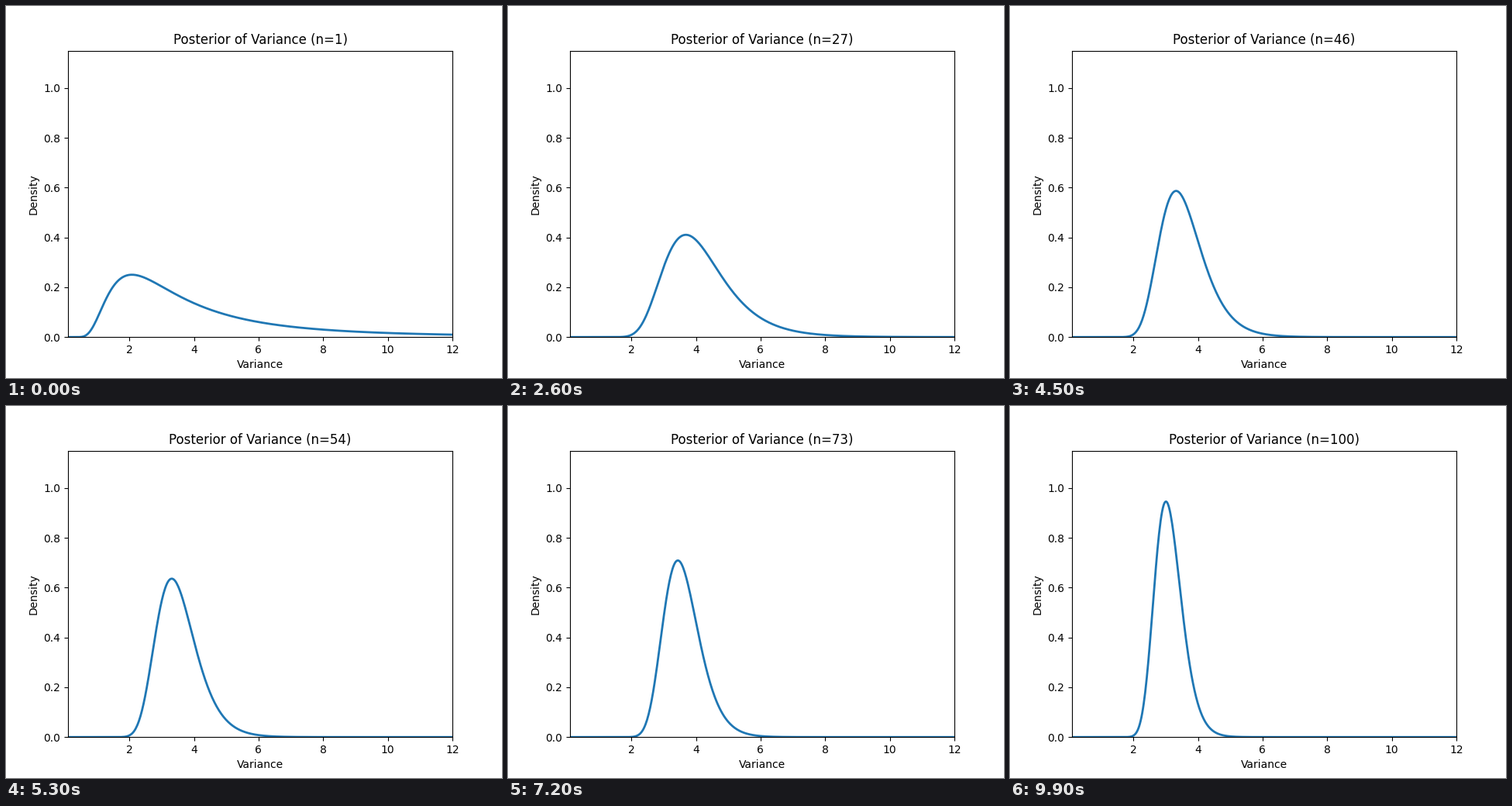
Animation, 640 px wide and 480 px high, one loop 10 s. Source, as a matplotlib script:

```python
from math import lgamma

import numpy as np
import matplotlib.pyplot as plt
from matplotlib.animation import FuncAnimation

N = 100
ALPHA0, BETA0 = 2.0, 2.0  # inverse-gamma prior
SIGMA = 2.0

np.random.seed(1)
data = np.random.normal(0, SIGMA, N)
sum_sq = np.cumsum(data ** 2)
x = np.linspace(0.1, 12, 500)


def inv_gamma_pdf(x, a, b):
    return np.exp(a * np.log(b) - lgamma(a) - (a + 1) * np.log(x) - b / x)


fig, ax = plt.subplots(figsize=(6.4, 4.8), dpi=100)
line, = ax.plot([], [], lw=2)
ax.set_xlim(0.1, 12)
ax.set_ylim(0, 1.15)
ax.set_xlabel("Variance")
ax.set_ylabel("Density")
title = ax.set_title("")


def update(i):
    n = i + 1
    line.set_data(x, inv_gamma_pdf(x, ALPHA0 + n / 2, BETA0 + sum_sq[i] / 2))
    title.set_text(f"Posterior of Variance (n={n})")
    return line, title


anim = FuncAnimation(fig, update, frames=N, interval=100, repeat=True,
                     repeat_delay=0, blit=False)
plt.show()
```
